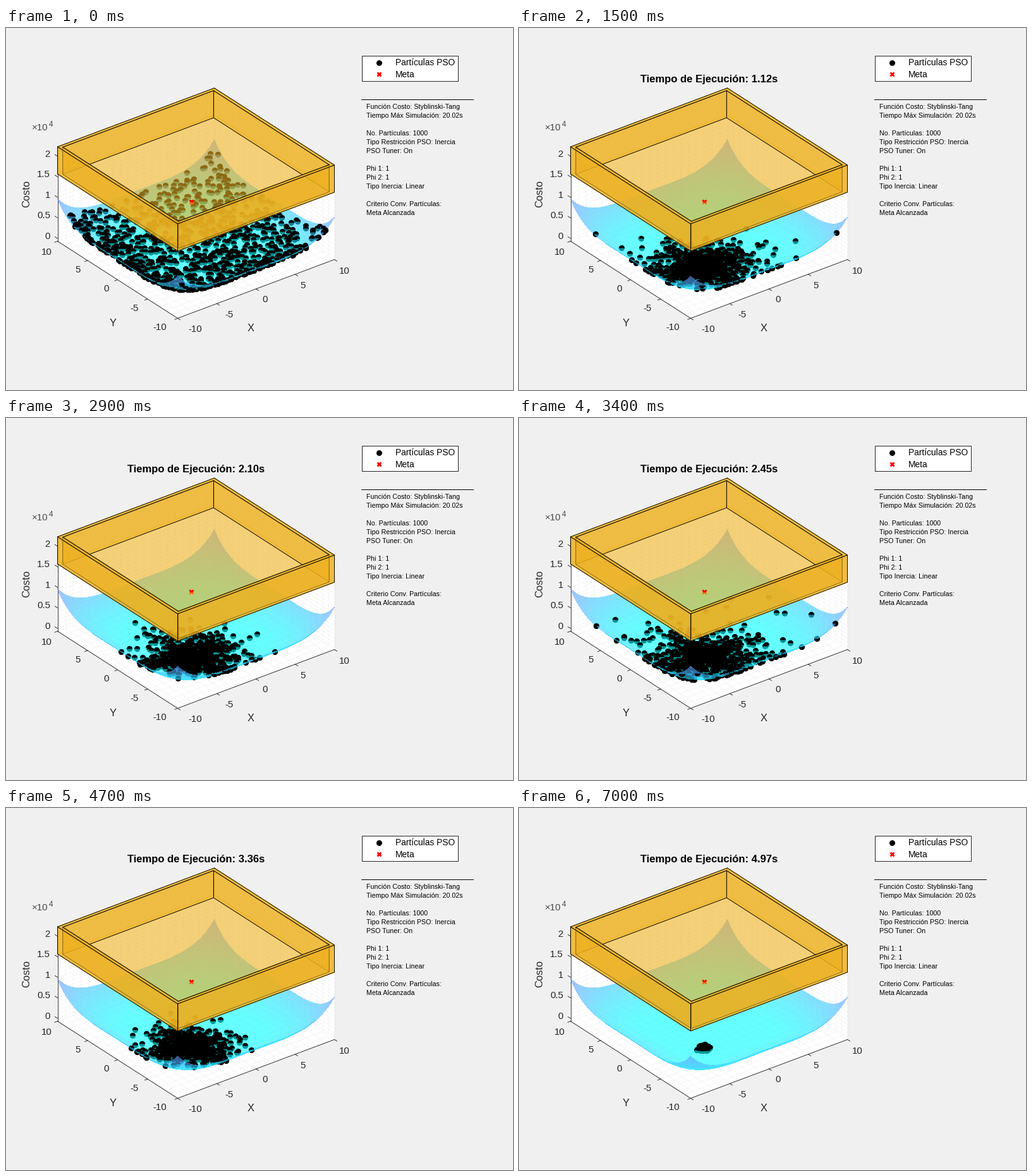
Recreate the animation shown at these times as a matplotlib script. Size 802 by 573 pixels, loop 7100 ms.

```python
import numpy as np
import matplotlib.pyplot as plt
from matplotlib.animation import FuncAnimation
from matplotlib.collections import LineCollection
from matplotlib.patches import Polygon, Rectangle
from matplotlib.path import Path

W, H, DPI = 802, 573, 100
PX = 72 / DPI                     # one pixel in points
FRAMES, STEP = 71, 100
BOX_LOW, BOX_TOP = 106.5, 149.5   # heights above the floor, in pixels
Z_ZERO, Z_UNIT = 4.5, 65          # height of z = 0, pixels per 10^4
GOAL = -2.9
INK = "#262626"
ORANGE = (0.929, 0.694, 0.125)

plt.rcParams["font.family"] = "Liberation Sans"
fig = plt.figure(figsize=(W / DPI, H / DPI), dpi=DPI, facecolor="#f0f0f0")
ax = fig.add_axes([0, 0, 1, 1])


def project(x, y, h=0):
    """World x, y and a height in pixels to stage pixels."""
    return 300.5 + 12.4 * x - 9.5 * y, 352 - 4.65 * x - 6.1 * y - h


def term(x):
    return 0.5 * (x**4 - 16 * x**2 + 5 * x)


def cost(x, y):
    return term(x) + term(y)


def height(x, y):
    c = cost(x, y)
    return 3.8 + 0.0066 * c + 8 * (c / 8400) ** 3


def outside(x, y, e=0.01):
    """True where the surface shows its underside to the viewer."""
    u0, v0 = project(x, y, height(x, y))
    u1, v1 = project(x + e, y, height(x + e, y))
    u2, v2 = project(x, y + e, height(x, y + e))
    return (u1 - u0) * (v2 - v0) - (u2 - u0) * (v1 - v0) > 0


def text(x, yc, s, size, ha="center", color=INK, z=20, **kw):
    return ax.text(x, yc + 0.36 * size, s, fontsize=size * PX, ha=ha,
                   va="baseline", color=color, zorder=z, **kw)


def line(p, q, color=INK, width=0.9, z=3):
    ax.plot([p[0], q[0]], [p[1], q[1]], color=color, lw=width * PX, zorder=z)


def face(points, z, edge=False):
    pts = [project(*p) for p in points]
    ax.add_patch(Polygon(pts, fc=ORANGE, alpha=0.6, lw=0, zorder=z,
                         antialiased=False))
    if edge:
        ax.add_patch(Polygon(pts, fill=False, ec="black", lw=0.9 * PX,
                             zorder=z))


# ---- axes walls, grid and ticks ----
def draw_grid():
    outline = [(-10, -10, 0), (-10, 10, 0), (-10, 10, BOX_TOP),
               (10, 10, BOX_TOP), (10, -10, BOX_TOP), (10, -10, 0)]
    ax.add_patch(Polygon([project(*p) for p in outline], fc="white", lw=0,
                         zorder=0))
    segs = []

    def seg(p, q):
        segs.append([project(*p), project(*q)])

    for v in range(-10, 11):
        seg((v, -10), (v, 10))
        seg((-10, v), (10, v))
        seg((v, 10, 0), (v, 10, BOX_TOP))
        seg((10, v, 0), (10, v, BOX_TOP))
    for h in np.arange(Z_ZERO, BOX_TOP, Z_UNIT / 10):
        seg((-10, 10, h), (10, 10, h))
        seg((10, -10, h), (10, 10, h))
    ax.add_collection(LineCollection(segs, colors="#d6d6d6", linewidths=0.8 * PX,
                                     linestyles=[(0, (1, 3))], zorder=1))


def draw_ticks():
    front, left, right = project(-10, -10), project(-10, 10), project(10, -10)
    line(front, left)
    line(front, right)
    line(left, project(-10, 10, BOX_TOP))
    x_spots = [(299, 476), (353, 453), (409.5, 429), (470, 407), (535, 384)]
    y_spots = [(243.5, 473), (203, 443), (159, 412), (114, 382), (64, 354)]
    for v, xs, ys in zip(range(-10, 11, 5), x_spots, y_spots):
        a, b = project(v, -10), project(-10, v)
        line(a, (a[0] + 4, a[1] + 2.5))
        line(b, (b[0] - 4.5, b[1] + 1.7))
        text(*xs, str(v), 15)
        text(*ys, str(v), 15)
    for i in range(5):
        u, v = project(-10, 10, Z_ZERO + i * Z_UNIT / 2)
        line((u, v), (u - 4, v - 2.5))
        text(70, v - 4.5, f"{i / 2:g}", 15, "right")
    text(387.5, 474, "X", 16.5)
    text(169.5, 466, "Y", 16.5)
    ax.text(33, 262, "Costo", fontsize=16.5 * PX, rotation=90, ha="center",
            va="center", color=INK)
    text(41, 157, "×10", 15, "left", "#4a4a4a")
    text(68, 152, "4", 12, "left", "#4a4a4a")


# ---- cost surface, split into the bowl and the lip facing the viewer ----
def draw_surface():
    g = np.linspace(-10, 10, 1400)
    x, y = (m.ravel() for m in np.meshgrid(g, g))
    u, v = project(x, y, height(x, y))
    col, row = u.astype(int), v.astype(int)
    tint = plt.get_cmap("cool", 64)
    lip = outside(x, y)
    for part, z in ((~lip, 5), (lip, 8)):
        layer = np.full((H, W), np.nan)
        layer[row[part], col[part]] = cost(x[part], y[part])
        rgba = tint((layer + 78) / 20500)
        rgba[..., 3] = 0.6 * ~np.isnan(layer)
        ax.imshow(rgba, extent=(0, W, H, 0), aspect="auto",
                  interpolation="nearest", zorder=z)


# ---- orange open box ----
def corners(r, h):
    return [(-r, -r, h), (-r, r, h), (r, r, h), (r, -r, h)]


def draw_box():
    outer_low, outer_top = corners(10, BOX_LOW), corners(10, BOX_TOP)
    inner_low, inner_top = corners(9.62, BOX_LOW), corners(9.62, BOX_TOP)

    def wall(low, top, i, z, edge):
        j = (i + 1) % 4
        face([low[i], low[j], top[j], top[i]], z, edge)

    face(outer_low, 10)
    for i in (1, 2):
        wall(outer_low, outer_top, i, 11, False)
        wall(inner_low, inner_top, i, 12, True)
    for i in (0, 3):
        wall(inner_low, inner_top, i, 13, True)
        wall(outer_low, outer_top, i, 14, True)
    for i in range(4):
        j = (i + 1) % 4
        face([outer_top[i], outer_top[j], inner_top[j], inner_top[i]], 15)
        for ring in (outer_top, inner_top):
            line(project(*ring[i]), project(*ring[j]), "black", z=16)


def draw_goal():
    u, v = 292.5, 275
    style = dict(marker="x", ms=6.5 * PX, mew=2.8 * PX, color="red", ls="none")
    ax.plot(u, v, zorder=9, **style)
    half, = ax.plot(u, v, zorder=17, **style)
    half.set_clip_path(Rectangle((u - 10, v - 10), 20, 10,
                                 transform=ax.transData))


def draw_side():
    ax.add_patch(Rectangle((562.5, 43.5), 152, 40, fc="white", ec=INK,
                           lw=PX, zorder=18))
    ax.plot(589.5, 54.5, "o", ms=9 * PX, color="black", mew=0, zorder=19)
    ax.plot(589.5, 73, "x", ms=6.5 * PX, mew=2.8 * PX, color="red", zorder=19)
    text(616, 54, "Partículas PSO", 13.8, "left", "black")
    text(616, 73, "Meta", 13.8, "left", "black")
    line((562, 112.5), (739, 112.5), "black", 1, z=18)
    notes = ["Función Costo: Styblinski-Tang", "Tiempo Máx Simulación: 20.02s",
             "", "No. Partículas: 1000", "Tipo Restricción PSO: Inercia",
             "PSO Tuner: On", "", "Phi 1: 1", "Phi 2: 1",
             "Tipo Inercia: Linear", "", "Criterio Conv. Partículas:",
             "Meta Alcanzada"]
    for i, s in enumerate(notes):
        text(570, 124.3 + 14 * i, s, 10.67, "left", "black")


# ---- swarm: damped oscillation of each particle around the goal ----
COUNT = 1000
rng = np.random.default_rng(7)
start = rng.uniform(-9.8, 9.8, (2, COUNT)) - GOAL
amp = rng.normal(0, 1.41, (2, COUNT))
omega = rng.normal(1.05, 0.09, (2, COUNT))
phase = rng.uniform(0, 2 * np.pi, (2, COUNT))
loose = rng.random(COUNT) < 0.22


def swarm(k):
    spread = np.interp(k, [0, 9, 20, 29, 40, 48, 56, 63, 70],
                       [1.9, 1.9, 2.0, 2.0, 2.1, 1.7, 1.05, 0.5, 0.16])
    burst = (0.5 + 0.5 * np.cos(2 * np.pi * (k - 20) / 6.6)) \
        * np.interp(k, [34, 44], [1, 0])
    fade = np.exp(-k / 3)
    scale = spread * (1 - fade) * (1 + 1.25 * burst * loose)
    off = start * fade * np.cos(1.05 * k) \
        + scale * amp * np.cos(omega * k + phase)
    return np.clip(GOAL + off, -9.8, 9.8)


def dots(marker, z):
    return ax.plot([], [], ls="none", marker=marker, ms=9.2 * PX, mew=0,
                   color="black", zorder=z)[0]


draw_grid()
draw_ticks()
draw_surface()
draw_box()
draw_goal()
draw_side()
whole = dots("o", 4)
upper = dots(Path.wedge(0, 180), 6)
lower = dots(Path.wedge(180, 360), 8.5)
title = text(300.5, 80.5, "", 16.6, color="black", weight="bold")
ax.set_xlim(0, W)
ax.set_ylim(H, 0)
ax.axis("off")


def update(k):
    x, y = swarm(k)
    u, v = project(x, y, height(x, y))
    lip = outside(x, y)
    whole.set_data(u, v)
    upper.set_data(u[~lip], v[~lip])
    lower.set_data(u[lip], v[lip])
    title.set_text(f"Tiempo de Ejecución: {0.07 * (k + 1):.2f}s" if k else "")
    return whole, upper, lower, title


anim = FuncAnimation(fig, update, frames=FRAMES, interval=STEP, repeat=True,
                     repeat_delay=0, blit=False)
plt.show()
```
